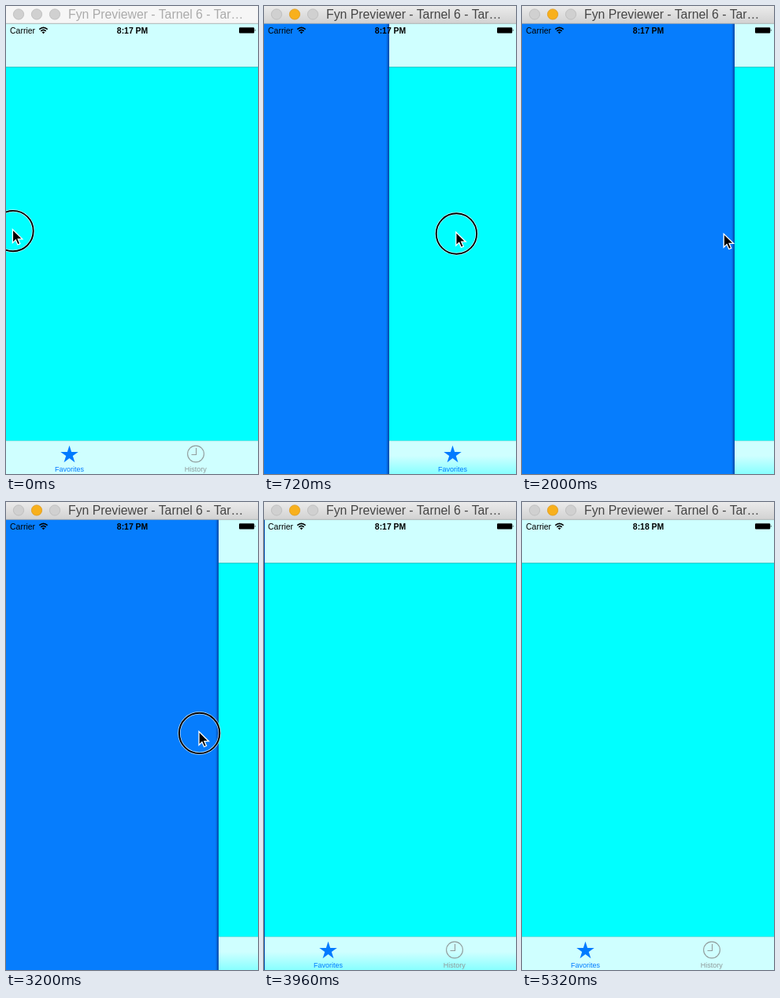
Recreate the animation shown at these times as an HTML page. Size 320 by 594 pixels, loop 6.76 s.

```html
<!DOCTYPE html>
<html lang="en">
<head>
<meta charset="utf-8">
<style>
  html, body { margin: 0; width: 100%; height: 100%; overflow: hidden; }
  svg { display: block; width: 320px; height: 594px; font-family: "Liberation Sans", Arial, sans-serif; }
</style>
</head>
<body>
<svg viewBox="0 0 320 594">
  <defs>
    <linearGradient id="chrome" x2="0" y2="1">
      <stop stop-color="#ebebeb"/><stop offset="1" stop-color="#d2d2d2"/>
    </linearGradient>
    <linearGradient id="edge">
      <stop stop-color="#003" stop-opacity="0"/><stop offset="1" stop-color="#003" stop-opacity=".45"/>
    </linearGradient>
    <linearGradient id="glow" x2="0" y2="1">
      <stop offset=".45" stop-color="#8ff" stop-opacity="0"/><stop offset="1" stop-color="#8ff"/>
    </linearGradient>
  </defs>

  <rect width="320" height="594" fill="#067dfd"/>

  <g id="panel">
    <rect id="shadow" x="-4" y="22" width="4" height="572" fill="url(#edge)"/>
    <rect y="22" width="320" height="572" fill="#0ff"/>
    <rect y="22" width="320" height="55" fill="#cfffff"/>
    <rect y="77" width="320" height=".6" fill="#57a3a3"/>
    <rect y="552" width="320" height="42" fill="#cfffff"/>
    <rect id="tint" y="552" width="320" height="42" fill="url(#glow)"/>
    <rect y="551.6" width="320" height=".6" fill="#8fcaca"/>
    <g font-size="9" text-anchor="middle">
      <path id="star" fill="#007aff"/>
      <text x="80.5" y="591" fill="#007aff">Favorites</text>
      <g fill="none" stroke="#929c9c" stroke-width="1.1">
        <circle cx="241" cy="568.5" r="10.4"/>
        <path d="M241.5 561v8.5h-6"/>
      </g>
      <text x="240.7" y="591" fill="#8f9a9a">History</text>
    </g>
  </g>

  <g font-size="10.5">
    <text x="5" y="35">Carrier</text>
    <text id="clock" x="160.5" y="35" font-weight="bold" font-size="10.4" text-anchor="middle"></text>
    <g fill="none" stroke="#000" stroke-width="1.6">
      <path d="M42.3 29.6q5.2-4.6 10.4 0M44.3 31.8q3.2-2.9 6.4 0"/>
    </g>
    <path d="M47.5 35.2l-1.9-2q1.9-1.5 3.8 0z"/>
    <rect x="296" y="27.2" width="19.2" height="7.2" rx="1"/>
    <path d="M315.8 29.3q1.8 1.5 0 3z"/>
  </g>

  <rect id="titlebar" width="320" height="22"/>
  <rect y="21.8" width="320" height=".9" fill="#aaa"/>
  <g fill="#d0d0d0" stroke="#b9b9b9" stroke-width=".8">
    <circle cx="16" cy="10.5" r="6.6"/>
    <circle id="minimize" cx="39" cy="10.5" r="6.6"/>
    <circle cx="62" cy="10.5" r="6.6"/>
  </g>
  <text id="title" x="79" y="16" font-size="15.8">Fyn Previewer - Tarnel 6 - Tar…</text>

  <g id="pointer">
    <g id="ring" fill="none">
      <circle cx=".6" cy="2" r="25.7" stroke="#fff" stroke-opacity=".75" stroke-width="3.4"/>
      <circle cx=".6" cy="2" r="25.7" stroke="#000" stroke-width="1.9"/>
    </g>
    <path d="M0 0v17l3.9-3.7 2.7 6 2.9-1.2-2.6-5.9h5.5z" stroke="#fff" stroke-width="1.3"/>
  </g>
</svg>

<script>
const LOOP = 6760, STEP = 40;
const el = id => document.getElementById(id);
const show = (id, visible) => el(id).setAttribute("visibility", visible ? "visible" : "hidden");

const linear = u => u;
const accelerate = u => u ** 1.5;
const settle = u => 1 - (1 - u) ** 2;
const smooth = u => u * u * (3 - 2 * u);

// Each segment: [start time, end time, end value, easing]
function animate(t, value, segments) {
  for (const [start, end, target, ease] of segments) {
    if (t <= start) break;
    value += (target - value) * ease(Math.min(1, (t - start) / (end - start)));
  }
  return value;
}

const panelX = t => Math.round(animate(t, 0, [
  [120, 720, 159.4, accelerate], [720, 1380, 270, settle],
  [3240, 3560, 70, smooth], [3560, 4020, 0, settle]
]));
const pointerX = t => animate(t, 8.4, [
  [80, 720, 243.8, smooth], [720, 800, 256.2, linear],
  [2800, 3040, 245, smooth], [3240, 3640, -32, smooth]
]);
const pointerY = t => animate(t, 283.6, [
  [80, 720, 287, linear], [720, 800, 289.2, linear], [2800, 3040, 291.4, smooth]
]);

function render(now) {
  const t = Math.floor(now % LOOP / STEP) * STEP;
  const x = panelX(t), active = t >= 160;

  el("panel").setAttribute("transform", `translate(${x})`);
  show("shadow", x > 0);
  show("tint", x > 0);

  el("titlebar").setAttribute("fill", active ? "url(#chrome)" : "#f6f6f6");
  el("title").setAttribute("fill", active ? "#454545" : "#ababab");
  el("minimize").setAttribute("fill", active ? "#f8b01c" : "#d0d0d0");
  el("minimize").setAttribute("stroke", active ? "#dd981a" : "#b9b9b9");
  el("clock").textContent = t < 4600 ? "8:17 PM" : "8:18 PM";

  el("pointer").setAttribute("transform", `translate(${pointerX(t)} ${pointerY(t)})`);
  show("pointer", t < 3640);
  show("ring", t < 760 || t >= 3080 && t < 3640);
}

el("star").setAttribute("d", "M" + Array.from({ length: 10 }, (_, i) => {
  const radius = i % 2 ? 4.5 : 11.8, angle = i * Math.PI / 5;
  return `${80.5 + radius * Math.sin(angle)} ${569.6 - radius * Math.cos(angle)}`;
}).join("L") + "z");

const begin = performance.now();
function tick() {
  render(performance.now() - begin);
  requestAnimationFrame(tick);
}
tick();
</script>
</body>
</html>
```
